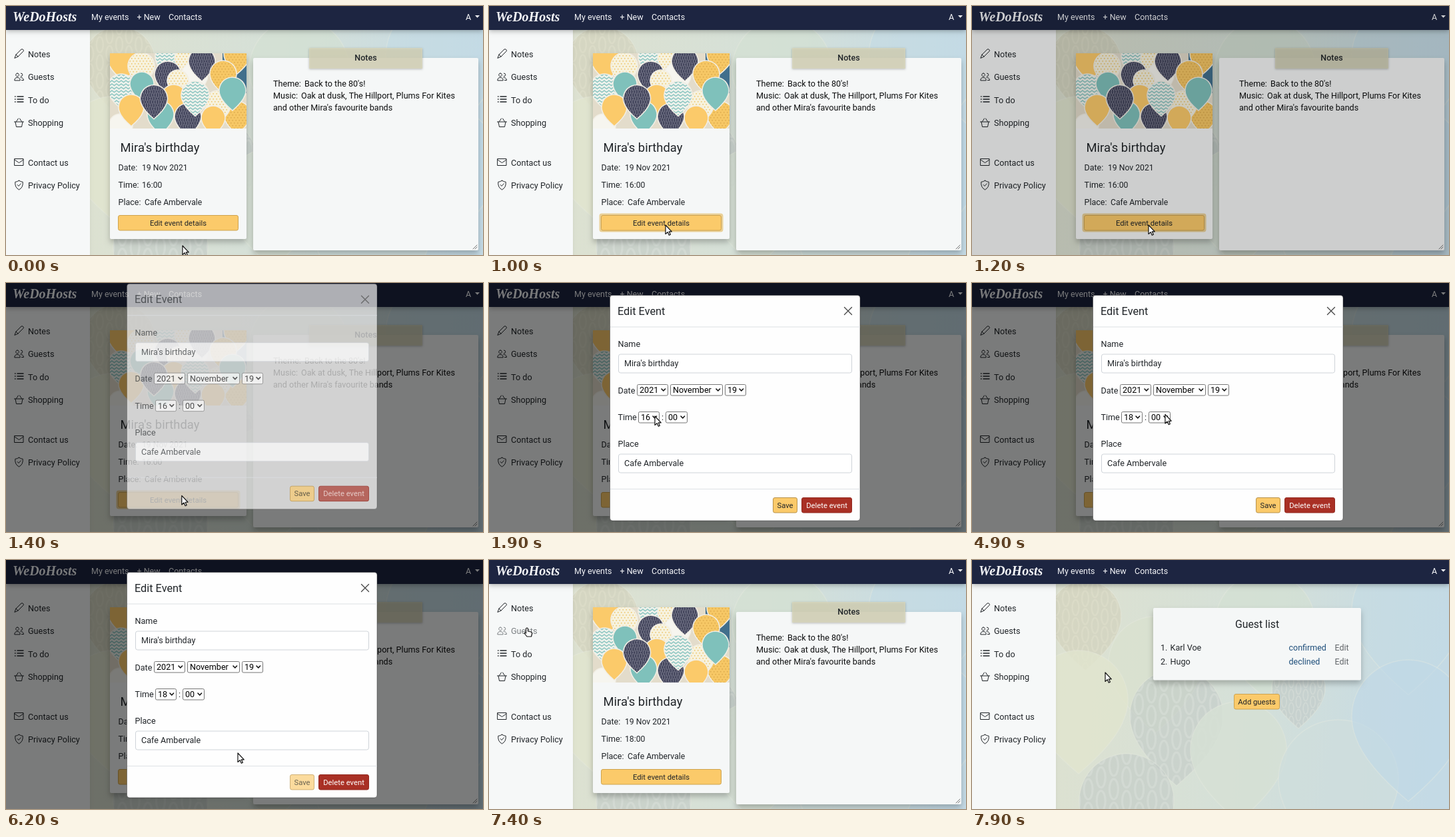
Recreate the animation shown at these times as an HTML page with a canvas. Size 716 by 374 pixels, loop 8000 ms.

```html
<!DOCTYPE html>
<html lang="en">
<head>
<meta charset="utf-8">
<title>Event planner</title>
<style>
html, body { margin: 0; width: 716px; height: 374px; overflow: hidden; background: #dbe1d6; }
canvas { display: block; }
</style>
</head>
<body>
<canvas id="stage" width="716" height="374"></canvas>
<script>
const W = 716, H = 374, LOOP = 8000, STEP = 100;
const c = document.getElementById('stage').getContext('2d');
const INK = '#212529', YELLOW = '#fbca6a', RIM = '#cda34f', NAVY = '#41435a', TEAL = '#7fc1bb';
const OPEN = 1150, LIST_OPEN = 2800, LIST_CLOSE = 4600, SAVED = 5600, CLOSED = 6300, GUESTS = 7600;

const clamp = v => Math.max(0, Math.min(1, v));
const ease = v => v * v * (3 - 2 * v);

function text(s, x, y, size = 12.6, color = INK, align = 'left', weight = 400) {
  c.font = `${weight} ${size}px Roboto, sans-serif`;
  c.fillStyle = color;
  c.textAlign = align;
  c.fillText(s, x, y);
}

function box(x, y, w, h, r, fill, line) {
  c.beginPath();
  c.roundRect(x, y, w, h, r);
  if (fill) { c.fillStyle = fill; c.fill(); }
  if (line) { c.strokeStyle = line; c.lineWidth = 1; c.stroke(); }
}

function path(d, x, y, color = INK, width = 1) {
  c.save();
  c.translate(x, y);
  c.strokeStyle = color;
  c.lineWidth = width;
  c.lineCap = c.lineJoin = 'round';
  c.stroke(new Path2D(d));
  c.restore();
}

function shadowed(draw, blur = 9, dy = 5, alpha = 0.24) {
  c.save();
  c.shadowColor = `rgba(0,0,0,${alpha})`;
  c.shadowBlur = blur;
  c.shadowOffsetY = dy;
  draw();
  c.restore();
}

function button(s, x, y, w, fill, line, color) {
  box(x + .5, y + .5, w - 1, 22.5, 2.5, fill, line);
  text(s, x + w / 2, y + 15.5, 11.25, color, 'center');
}

// Balloons

function tear(x, y, r) {
  c.beginPath();
  c.arc(x, y, r, Math.PI * .88, Math.PI * .12);
  c.quadraticCurveTo(x + r * .76, y + r * .86, x, y + r * 1.5);
  c.quadraticCurveTo(x - r * .76, y + r * .86, x - r * .93, y + r * .37);
  c.closePath();
}

const patterns = {
  plain() {},
  dots(x, y, r, color) {
    c.fillStyle = color;
    for (let j = -r, k = 0; j < r * 1.5; j += 4, k++)
      for (let i = -r + (k % 2) * 2.5; i < r; i += 5) c.fillRect(x + i, y + j, 1.5, 1.5);
  },
  zig(x, y, r, color) {
    c.strokeStyle = color;
    c.lineWidth = 1.5;
    for (let j = -r; j < r * 1.5; j += 5) {
      c.beginPath();
      for (let i = -r, k = 0; i <= r + 4; i += 3.5, k++) c.lineTo(x + i, y + j + (k % 2) * 2.6);
      c.stroke();
    }
  },
  leaf(x, y, r, color) {
    c.strokeStyle = color;
    c.lineWidth = r * .045;
    const w = r * .27, h = r * .5;
    for (let i = -4, k = 0; i <= 4; i++, k++)
      for (let j = -3; j <= 3; j++) {
        c.beginPath();
        c.ellipse(x + i * w, y + j * h + (k % 2) * h / 2, w * .34, h * .43, 0, 0, 7);
        c.stroke();
      }
  }
};

function balloon(x, y, r, fill, kind = 'plain', mark = '', rim = '#f2efe6', width = 1.5) {
  tear(x, y, r);
  c.fillStyle = fill;
  c.fill();
  c.save();
  c.clip();
  patterns[kind](x, y, r, mark);
  c.restore();
  tear(x, y, r);
  c.strokeStyle = rim;
  c.lineWidth = width;
  c.stroke();
}

const kinds = {
  y: [YELLOW], t: [TEAL], w: ['#f6f5ef'],
  n: [NAVY, 'leaf', '#8b8c9c'],
  z: ['#eef2ec', 'zig', '#8fc7c2'],
  d: ['#f7f2dd', 'dots', '#ecc367'],
  o: ['#f6c765', 'dots', '#dca94b']
};
const bunch = [
  ['w', 172, 180, 18], ['y', 176, 77, 24], ['z', 246, 76, 22], ['o', 347, 72, 20],
  ['d', 268, 78, 15], ['d', 203, 90, 20], ['n', 243, 103, 20], ['w', 283, 104, 20],
  ['n', 294, 83, 20], ['z', 173, 123, 21], ['t', 204, 117, 18], ['d', 258, 112, 16],
  ['o', 326, 102, 20], ['y', 188, 152, 19], ['y', 252, 137, 19], ['o', 347, 163, 20],
  ['d', 318, 147, 20], ['t', 232, 163, 20], ['t', 340, 127, 20], ['y', 311, 168, 18],
  ['n', 273, 166, 20], ['z', 284, 134, 21], ['n', 222, 139, 20.5]
];

function picture() {
  c.save();
  c.beginPath();
  c.rect(156, 71, 205, 113);
  c.clip();
  c.fillStyle = '#e3dccb';
  c.fillRect(156, 71, 205, 113);
  c.fillStyle = '#416f8c';
  c.fillRect(325, 71, 36, 60);
  for (const [k, x, y, r] of bunch) balloon(x, y, r, ...kinds[k]);
  c.restore();
}

function backdrop() {
  const g = c.createLinearGradient(126, 0, W, 60);
  g.addColorStop(0, '#dde1d0');
  g.addColorStop(.5, '#d5e0d8');
  g.addColorStop(1, '#c4dae5');
  c.fillStyle = g;
  c.fillRect(0, 0, W, H);
  const rim = 'rgba(232,236,224,.35)';
  const pale = (x, y, r, fill, kind, mark) => balloon(x, y, r, fill, kind, mark, rim, 1.5);
  const grey = 'rgba(194,202,198,.6)', vein = 'rgba(220,226,220,.5)';
  pale(655, 75, 85, 'rgba(196,219,230,.5)');
  pale(440, 95, 75, 'rgba(212,225,211,.6)');
  pale(170, 85, 54, 'rgba(208,207,185,.6)', 'leaf', 'rgba(226,225,206,.5)');
  pale(275, 155, 70, 'rgba(218,225,207,.7)');
  pale(160, 210, 74, 'rgba(226,229,207,.8)');
  pale(490, 193, 40, grey, 'leaf', vein);
  pale(307, 234, 70, grey, 'leaf', vein);
  pale(400, 285, 72, 'rgba(214,225,213,.85)');
  pale(550, 330, 90, 'rgba(207,222,221,.75)');
  pale(655, 235, 85, 'rgba(193,217,231,.65)');
  pale(232, 362, 71, grey, 'leaf', vein);
}

// Page parts

const icons = [
  ['M1 14l2-5 8-8q2-1 3 1t0 2l-8 8zM3 9l3 3', 12, 64],
  ['M5 2.5a2.4 2.4 0 1 0 .1 0M10.5 2.5a2.4 2.4 0 1 1-.3 4.8M.8 13q0-4 4.2-4t4.2 4zM10 9q4-.3 4.5 4h-3', 12, 98.5],
  ['M5 3h9M5 7h9M5 11h9M1.5 3h.6M1.5 7h.6M1.5 11h.6', 12, 133],
  ['M.5 6h14M2 6l1.5 7.5h8L13 6M3.500 5.500l3-4.500M11.500 5.500l-3-4.500', 12, 168],
  ['M1 2.5h13v10H1zM1 4l6.5 4.500L14 4', 12, 227],
  ['M7.5.8q3 1.8 5.7 2Q14 11 7.5 14.5 1 11 1.8 2.8 4.5 2.6 7.5.8zM5.2 7l1.8 2 3.2-3.6', 12, 261.5]
];
const links = ['Notes', 'Guests', 'To do', 'Shopping', 'Contact us', 'Privacy Policy'];
const linkY = [76.5, 111, 145.5, 180, 239.5, 274];

function chrome(hover) {
  shadowed(() => box(0, 36, 126, H, 0, '#f6f8f8'), 4, 0, .08);
  shadowed(() => box(0, 0, W, 36, 0, '#1d2541'), 7, 2, .28);
  c.font = 'italic 700 20px "Liberation Serif", serif';
  c.fillStyle = '#f4f5f8';
  c.textAlign = 'left';
  c.fillText('WeDoHosts', 10, 23);
  const light = '#f4f5f8';
  text('My events', 128, 20.5, 12.5, light);
  text('+ New', 196.5, 20.5, 12.5, light);
  text('Contacts', 244, 20.5, 12.5, light);
  text('A', 690, 20.5, 12.5, light);
  c.beginPath();
  c.moveTo(704, 14);
  c.lineTo(711, 14);
  c.lineTo(707.5, 17.7);
  c.fill();
  links.forEach((s, i) => {
    const color = hover && i === 1 ? '#7c8083' : INK;
    path(...icons[i], color, i === 2 ? 1.4 : 1);
    text(s, 33, linkY[i], 12.65, color);
  });
}

function eventPage(hour, focus) {
  shadowed(() => box(156, 71, 205, 279, 2, '#f5f7f7'));
  picture();
  text("Mira's birthday", 171.5, 218.5, 18.4);
  [['Date:', '19 Nov 2021', 204, 246.5], ['Time:', hour + ':00', 204, 273],
   ['Place:', 'Cafe Ambervale', 208, 299]].forEach(([a, b, x, y]) => {
    text(a, 168.5, y, 12.5);
    text(b, x, y, 12.2);
  });
  if (focus) box(165.5, 311.5, 186, 28, 4, 'rgba(226,184,91,.6)');
  button('Edit event details', 168, 314, 181, YELLOW, RIM, INK);

  shadowed(() => box(371, 78, 338, 289, 2, '#f5f7f7'));
  shadowed(() => box(455, 63, 170, 31, 0, 'rgba(218,215,187,.8)'), 3, 1, .3);
  text('Notes', 540, 82, 12.5, INK, 'center', 500);
  const black = '#0c0d0e';
  text('Theme:', 401, 121, 12.6, black);
  text("Back to the 80's!", 448, 121, 12.6, black);
  text('Music:', 401, 139, 12.6, black);
  text('Oak at dusk, The Hillport, Plums For Kites', 443, 139, 12.6, black);
  text("and other Mira's favourite bands", 401, 157, 12.6, black);
  path('M0 6L6 0M3 6l3-3', 701, 359, '#777', 1);
}

function guestPage() {
  shadowed(() => box(272, 72, 312, 108.5, 2, '#f5f7f7'));
  text('Guest list', 428, 101.5, 15.8, INK, 'center');
  [['1.', 'Karl Voe', 'confirmed'], ['2.', 'Hugo', 'declined']].forEach(([n, name, state], i) => {
    const y = 136 + i * 21.3;
    text(n, 283, y);
    text(name, 297.5, y);
    text(state, 475.5, y, 12.5, '#1f4f7b');
    text('Edit', 544.5, y, 12.5, '#62666a');
  });
  button('Add guests', 393, 201, 69, YELLOW, RIM, INK);
}

function select(s, x, y, w) {
  box(x + .5, y + .5, w - 1, 16.5, 2, '#fff', '#777');
  text(s, x + 4, y + 13, 12.6, '#000');
  path('M0 0l2.8 3L5.6 0', x + w - 10, y + 7, '#111', 1.6);
}

function field(label, value, y) {
  text(label, 193.5, y);
  box(194.5, y + 11, 350, 28, 3, '#fff', '#cfd4d9');
  text(value, 203, y + 29);
}

function modal(hour, waiting) {
  box(181.5, 18.5, 375.5, 338.5, 4, '#fefefe', 'rgba(40,40,40,.45)');
  text('Edit Event', 193, 47.5, 16.3);
  path('M0 0l11 11M11 0L0 11', 533.5, 36.5, '#4a4a4a', 1.4);
  c.fillStyle = '#dee2e6';
  c.fillRect(182, 65.5, 375, 1);
  c.fillRect(182, 309, 375, 1);
  field('Name', "Mira's birthday", 96);
  text('Date', 193.5, 165.5);
  select('2021', 222, 152, 47);
  select('November', 272, 152, 79);
  select('19', 354, 152, 32);
  text('Time', 193.5, 206);
  select(hour, 224, 193, 32);
  text(':', 259, 206);
  select('00', 265, 193, 33);
  field('Place', 'Cafe Ambervale', 246);
  button('Delete event', 469, 322, 76, '#a93025', '#92281f', '#fff');
  if (waiting) c.globalAlpha *= .65;
  button('Save', 426, 322, 37, YELLOW, '#b8924a', INK);
}

function hourList(t) {
  const scroll = 45 * ease(clamp((t - 3700) / 500));
  const picked = t < 4000 ? 16 : t < 4200 ? 17 : 18;
  c.save();
  box(224.5, -3, 31, 196, 0, '#fff', '#777');
  c.beginPath();
  c.rect(225, 0, 30, 192.5);
  c.clip();
  for (let i = 0; i < 24; i++) {
    const y = 165.5 + (i - 16) * 15.2 - scroll;
    if (i === picked) box(225, y - 7.6, 19.5, 15.2, 0, '#1e90f0');
    text(String(i).padStart(2, '0'), 227.5, y + 4.5, 12.2, i === picked ? '#fff' : '#111');
  }
  box(245, 0, 10, 193, 0, '#f1f1f1');
  box(246, -5, 8, 125 + scroll * .62, 0, '#bcbcbc');
  c.fillStyle = '#444';
  c.beginPath();
  c.moveTo(247, 185);
  c.lineTo(253, 185);
  c.lineTo(250, 188);
  c.fill();
  c.restore();
}

// Pointer

const route = [
  [0, 265, 360], [400, 265, 360], [900, 265, 329], [1300, 265, 329], [1900, 249, 200],
  [2500, 238, 201], [3600, 238, 201], [4200, 236, 150], [4700, 236, 150], [5300, 444, 333],
  [5800, 444, 333], [6200, 348, 290], [6400, 340, 285], [7200, 57, 102], [7600, 57, 102],
  [7900, 200, 169]
];

function pointerAt(t) {
  const i = route.findIndex(p => p[0] > t);
  if (i < 0) return route[route.length - 1].slice(1);
  const [t0, x0, y0] = route[i - 1], [t1, x1, y1] = route[i];
  const k = ease((t - t0) / (t1 - t0));
  return [x0 + (x1 - x0) * k, y0 + (y1 - y0) * k];
}

function pointer(x, y, hand) {
  const shape = new Path2D(hand
    ? 'M-1.5 7V1Q0-1 1.5 1V5L6 6Q8 6.5 7.5 9L6.5 13H0L-4 8Q-4 6-1.5 8z'
    : 'M0 0V13.5L3.2 10.6 5.3 15.3 7.4 14.3 5.3 9.8H9.3z');
  c.save();
  c.translate(x, y);
  c.lineJoin = 'round';
  c.fillStyle = '#fff';
  c.fill(shape);
  c.strokeStyle = '#111';
  c.lineWidth = 1.2;
  c.stroke(shape);
  c.restore();
}

function draw(t) {
  const [px, py] = pointerAt(t);
  const hover = px < 90 && py > 92 && py < 122 && t < GUESTS;
  backdrop();
  if (t < GUESTS) eventPage(t < CLOSED ? 16 : 18, t >= 1000 && t < 1500);
  else guestPage();
  chrome(hover);
  if (t >= OPEN && t < CLOSED) {
    c.fillStyle = `rgba(0,0,0,${.5 * clamp((t - OPEN) / 150)})`;
    c.fillRect(0, 0, W, H);
    const rise = 1 - clamp((t - 1300) / 300);
    c.save();
    c.globalAlpha = clamp((t - 1300) / 150);
    c.translate(0, -39 * rise * rise);
    modal(t < LIST_CLOSE ? '16' : '18', t >= SAVED);
    c.restore();
    if (t >= LIST_OPEN && t < LIST_CLOSE) hourList(t);
  }
  pointer(px, py, hover);
}

const start = performance.now();
let last = -1;
function tick() {
  const t = Math.floor(((performance.now() - start) % LOOP) / STEP) * STEP;
  if (t !== last) draw(last = t);
  requestAnimationFrame(tick);
}
tick();
</script>
</body>
</html>
```
